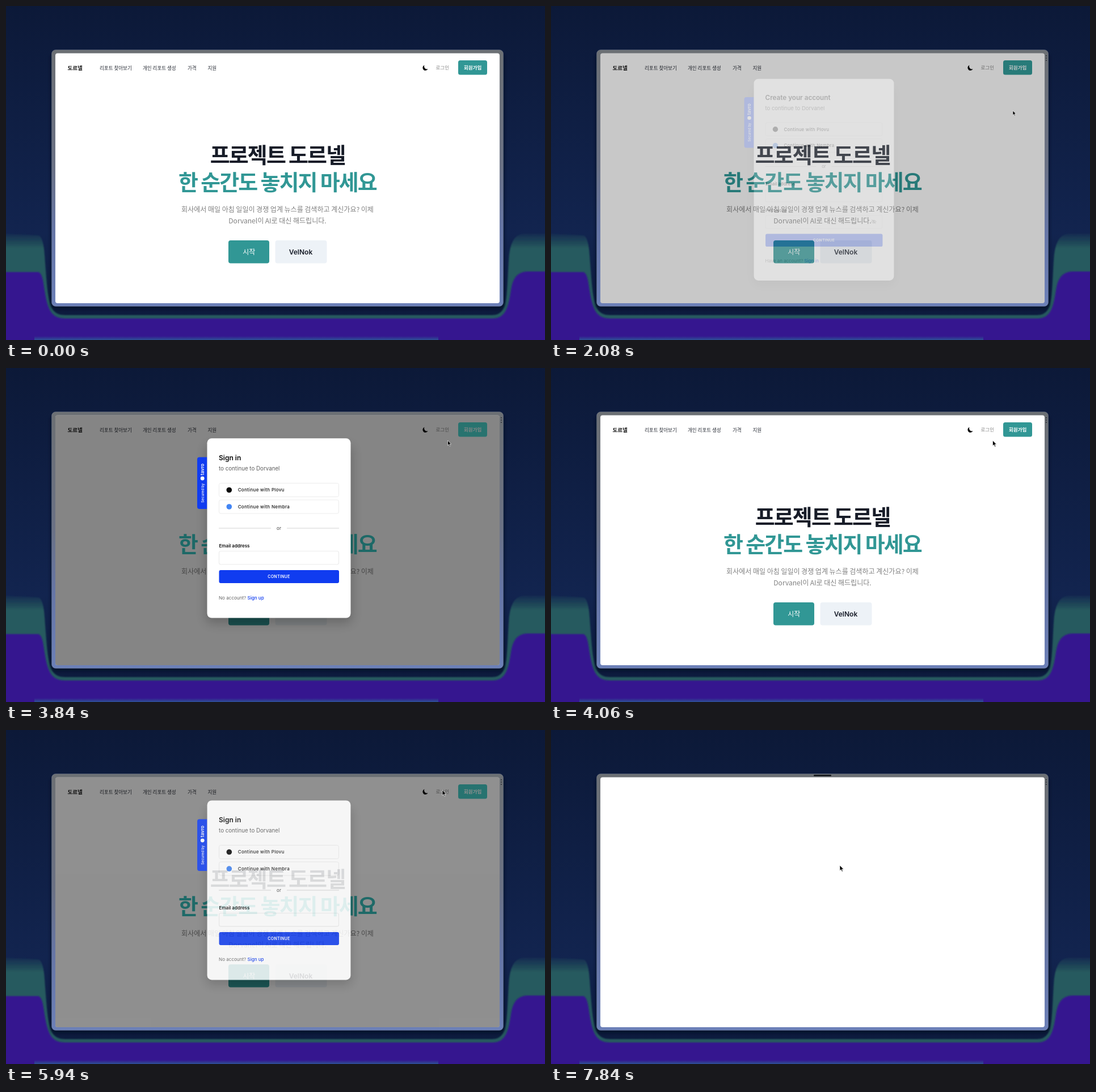
Recreate the animation shown at these times as an HTML page. Size 950x590 px, loop 8000 ms.

```html
<!DOCTYPE html>
<html lang="ko">
<head>
<meta charset="utf-8">
<style>
html, body { margin: 0; width: 100%; height: 100%; overflow: hidden; background: #0d1a3a; }
svg { display: block; width: 950px; height: 590px; }
text { font-family: Inter, 'Noto Sans CJK KR', 'Noto Sans CJK', sans-serif; white-space: pre; }
.ko text { font-family: 'Noto Sans CJK KR', 'Noto Sans CJK', Inter, sans-serif; word-spacing: -.07em; }
.mid { text-anchor: middle; }
</style>
</head>
<body>
<svg viewBox="0 0 950 590" xmlns="http://www.w3.org/2000/svg">
  <defs>
    <linearGradient id="sky" x2="0" y2="1">
      <stop offset="0" stop-color="#0c1938"/><stop offset=".68" stop-color="#12244f"/><stop offset="1" stop-color="#0b1838"/>
    </linearGradient>
    <linearGradient id="haze" gradientUnits="userSpaceOnUse" x1="0" x2="0" y1="398" y2="428">
      <stop offset="0" stop-color="#265a5e" stop-opacity="0"/><stop offset="1" stop-color="#265a5e"/>
    </linearGradient>
    <linearGradient id="frame" x2="0" y2="1">
      <stop offset="0" stop-color="#6c7074"/><stop offset=".45" stop-color="#6b7285"/>
      <stop offset=".7" stop-color="#6676a6"/><stop offset="1" stop-color="#6c80b8"/>
    </linearGradient>
    <linearGradient id="floor" x2="0" y2="1">
      <stop offset="0" stop-color="#2a6a98" stop-opacity="0"/><stop offset="1" stop-color="#2a6a98" stop-opacity=".7"/>
    </linearGradient>
    <filter id="soft"><feGaussianBlur stdDeviation="1"/></filter>
    <filter id="shade" x="-20%" y="-20%" width="140%" height="140%"><feGaussianBlur stdDeviation="9"/></filter>
    <filter id="near" x="-20%" y="-20%" width="140%" height="140%"><feGaussianBlur stdDeviation="2"/></filter>
    <clipPath id="view"><rect x="87" y="83.5" width="783" height="441.5" rx="4"/></clipPath>
  </defs>

  <rect width="950" height="590" fill="url(#sky)"/>
  <path fill="url(#haze)" filter="url(#soft)" d="M-5 402L58 405Q66 410 68 440C74 520 74 546 104 546H856C884 546 882 520 886 450Q888 404 912 402H955V595H-5Z"/>
  <path fill="#35168f" filter="url(#soft)" d="M-5 470H56Q63 470 66 490C72 530 76 552 104 552H858C882 552 886 528 890 502Q894 470 918 469H955V595H-5Z"/>
  <rect x="50" y="583" width="712" height="7" fill="url(#floor)"/>
  <rect x="78" y="82" width="801" height="454" rx="9" fill="#050c20" opacity=".55" filter="url(#near)"/>
  <rect x="80.5" y="77.5" width="796" height="453" rx="7" fill="url(#frame)" stroke="#8389a0" stroke-opacity=".4"/>
  <g id="dots" fill="#33363c"><circle cx="873" cy="88" r="1.1"/><circle cx="873" cy="92" r="1.1"/><circle cx="873" cy="96" r="1.1"/></g>
  <rect id="bar" y="79" height="2.5" rx="1.2" fill="#111418"/>

  <g clip-path="url(#view)">
    <rect x="87" y="83" width="783" height="443" fill="#fff"/>
    <g id="page" class="ko"></g>
    <g id="layer">
      <rect x="87" y="83" width="783" height="443" opacity=".48"/>
      <g id="up"></g>
      <g id="in"></g>
    </g>
  </g>
  <g id="arrow"><path d="M0 0V9.6L2.2 7.6L3.8 11.2L5.4 10.5L3.8 7H6.8Z" stroke="#fff" stroke-width=".7" stroke-linejoin="round"/></g>
  <g id="hand"><path d="M-1.2 1Q0-.6 1.2 1V4L2.2 3.6Q3 3.6 3.2 4.2Q4.4 4 4.6 4.9Q6 4.8 6 6V8.5L4.8 11H-1L-3.6 7.2Q-4.3 5.8-2.9 5.9L-1.2 7.4Z" fill="#fff" stroke="#111" stroke-width=".9" stroke-linejoin="round"/></g>
</svg>
<script>
const $ = id => document.getElementById(id);
const LOOP = 8000;
const BLUE = '#103cf0';

const text = (x, y, size, str, fill = '#111', weight = 400, more = '') =>
  `<text x="${x}" y="${y}" font-size="${size}" fill="${fill}" font-weight="${weight}" ${more}>${str}</text>`;
const rect = (x, y, w, h, r, fill, more = '') =>
  `<rect x="${x}" y="${y}" width="${w}" height="${h}" rx="${r}" fill="${fill}" ${more}/>`;
const dot = (x, y, r, fill) => `<circle cx="${x}" cy="${y}" r="${r}" fill="${fill}"/>`;
const MID = 'class="mid"';

// Landing page
const nav = [[165, '리포트 찾아보기'], [241, '개인 리포트 생성'], [320, '가격'], [355.5, '지원']];
$('page').innerHTML =
  text(108.5, 112.7, 9.5, '도르넬', '#111', 700) +
  nav.map(([x, s]) => text(x, 112.5, 8.55, s, '#2b2f38', 500)).join('') +
  '<path d="M737.6 104.6A4.8 4.8 0 1 0 743.6 110.9A4.6 4.6 0 0 1 737.6 104.6Z" fill="#0a0a0a"/>' +
  text(757.5, 112.3, 8.5, '로그인', '#8a8a8a') +
  rect(797, 96, 51, 25.5, 3.5, '#319795', 'id="join"') +
  text(822.7, 112.2, 8.5, '회원가입', '#fff', 700, MID) +
  text(478.5, 277.4, 38, '프로젝트 도르넬', '#171c28', 700, MID + ' letter-spacing="-1.9"') +
  text(478.5, 325.4, 38, '한 순간도 놓치지 마세요', '#319795', 700, MID + ' id="slogan" letter-spacing="-1.9"') +
  text(478.5, 364.3, 12.05, '회사에서 매일 아침 일일이 경쟁 업계 뉴스를 검색하고 계신가요? 이제', '#808080', 400, MID) +
  text(478.5, 383.8, 12.05, 'Dorvanel이 AI로 대신 해드립니다.', '#808080', 400, MID) +
  rect(392, 414, 72, 40.5, 4, '#319795') +
  text(428.2, 438.8, 12, '시작', '#fff', 500, MID) +
  rect(474.5, 414, 91, 40.5, 4, '#edf2f7') +
  text(519.5, 438.8, 12, 'VelNok', '#171c28', 600, MID + ' style="font-family:Inter,sans-serif"');

// Account dialogs
const box = (y, h, more = '') => rect(375.5, y, 211, h, 3, '#fff', `stroke="#ececec" ${more}`);
const provider = (y, name, color, id) =>
  box(y - 12, 24) + `<g id="${id}">${dot(393.3, y, 4.8, color)}</g>` +
  text(408.7, y + 2.9, 8, 'Continue with ' + name, '#151515', 500, 'letter-spacing=".3"');
const field = (y, label) =>
  text(375.5, y + 2.9, 8, label, '#111', 600) + box(y + 9, 23.5, 'stroke-width="1.2"');

function dialog(key, title, height, fields, btnY, ask, link) {
  return rect(352, 136, 258, height - 2, 12, '#000', 'opacity=".2" filter="url(#shade)"') +
    `<path d="M354.5 157.5H341Q337 157.5 337 161.5V245Q337 249 341 249H354.5Z" fill="${BLUE}"/>` +
    `<g transform="translate(348.6 238)rotate(-90)">${text(0, 0, 6.3, 'Secured by', '#fff', 500)}${dot(43, -2.4, 3.4, '#fff')}${text(48.5, .6, 8.3, 'tavro', '#fff', 600)}</g>` +
    rect(354.5, 124.3, 253, height, 8, '#fff') +
    text(375, 163, 12, title, '#0b0b0b', 600) +
    text(375, 180.6, 9.75, 'to continue to Dorvanel', '#5c5c5c') +
    provider(215.5, 'Plovu', '#0a0a0a', key + 'A') + provider(245, 'Nembra', '#4285f4', key + 'B') +
    '<path d="M375 283H467M495 283H587" stroke="#d4d4d4"/>' +
    text(481, 285.7, 8, 'or', '#444', 400, MID) + fields +
    rect(375.5, btnY - 11.5, 211.5, 23, 3, BLUE) +
    text(481, btnY + 2.5, 7, 'CONTINUE', '#fff', 600, MID + ' letter-spacing=".3"') +
    text(375, btnY + 40, 8.1, `${ask} <tspan fill="${BLUE}" font-weight="500">${link}</tspan>`, '#666');
}

const eye = '<g fill="none" stroke="#777" stroke-width=".9"><path d="M566.5 382.8Q571 377.5 575.5 382.8Q571 388 566.5 382.8Z"/><circle cx="571" cy="382.8" r="1.4"/><path d="M567.5 379L574.5 386.5"/></g>';
const entry = (y, name) =>
  text(414.5, y - 1.8, 8.6, name, '#fff', 500) + text(414.5, y + 8.3, 7.7, 'hey@vum.zz', '#bdbdbd');

$('up').innerHTML = dialog('u', 'Create your account', 365, field(314.5, 'Email address') + field(362.5, 'Password') + eye,
  416.5, 'Have an account?', 'Sign in');
$('in').innerHTML = dialog('i', 'Sign in', 317.2, field(314.5, 'Email address'), 368.5, 'No account?', 'Sign up') +
  '<path id="go" d="M564.5 245H572.5M569 241.5L572.5 245L569 248.5" fill="none" stroke="#666"/>' +
  '<path id="spin" d="M393.3 240.5A4.5 4.5 0 1 1 388.8 245" fill="none" stroke="#555" stroke-width="1.2"/>' +
  '<g id="saved">' + dot(569, 335, 7.3, '#1a6fd8') +
  rect(375, 348, 159, 66, 5, '#000', 'opacity=".3" filter="url(#near)"') +
  rect(375.5, 347, 158.5, 66, 4.5, '#232323', 'stroke="#3a3a3a" stroke-width=".6"') +
  rect(388, 356, 19.5, 19.5, 3, '#e8dba6') + text(397.7, 368.4, 7, 'ne', '#91845a', 600, MID) + entry(366, 'newsletters.vum.zz') +
  rect(388, 384, 19.5, 19.5, 3, '#0c0c0c') + dot(397.7, 393.7, 8.6, '#f2f2f2') + entry(394, 'Quovine') + '</g>';

// [time, x, y] of the pointer tip
const path = [
  [320, 921, 176], [560, 858, 124], [760, 834, 113], [1480, 834, 113], [1900, 814, 185], [2260, 814, 185],
  [2660, 769, 108], [3300, 769, 108], [3700, 778.5, 128], [4940, 778.5, 128], [5200, 585.5, 232.5],
  [5270, 575, 236], [5560, 778, 89], [5720, 769, 106], [6060, 769, 106], [6500, 510.5, 234],
  [6740, 510.5, 234], [7000, 509, 239]
];
const hands = [[640, 900], [2560, 2830], [5590, 5830], [6380, 6760]];
const saves = [[3180, 3800], [6190, 6690]];
const clicks = [850, 2060, 2780, 3915, 5780, 6680];
const shows = [['up', 900, 2025, 306.8], ['in', 2820, 3880, 282.9], ['in', 5820, 9000, 282.9]];
const BLANK = 7700, LOAD = 6690, FADE = 170, PRESS = 130;

const clamp = v => Math.max(0, Math.min(1, v));
const within = (list, t) => list.some(([a, b]) => t >= a && t < b);
const show = (id, on) => $(id).style.display = on ? '' : 'none';
const mix = (a, b, k) => `rgb(${a.map((v, i) => Math.round(v + (b[i] - v) * k))})`;
const smooth = p => p * p * (3 - 2 * p);
const TEAL = [49, 151, 149];

function tip(t) {
  let i = path.findIndex(p => p[0] > t);
  if (i < 0) return path[path.length - 1].slice(1);
  const [t0, x0, y0] = path[Math.max(0, i - 1)], [t1, x1, y1] = path[i];
  const e = smooth(clamp((t - t0) / (t1 - t0 || 1)));
  return [x0 + (x1 - x0) * e, y0 + (y1 - y0) * e];
}

function draw(t) {
  const blank = t >= BLANK;
  const now = blank ? null : shows.find(s => t >= s[1] && t < s[2] + FADE);
  let k = 0;
  show('up', now && now[0] === 'up');
  show('in', now && now[0] === 'in');
  if (now) {
    const [id, start, end, cy] = now;
    k = t < end ? 1 - (1 - clamp((t - start) / FADE)) ** 2 : (1 - clamp((t - end) / FADE)) ** 2;
    const s = 1 - .08 * (1 - k) ** 2;
    $(id).setAttribute('transform', `translate(481 ${cy})scale(${s})translate(-481 ${-cy})`);
    $(id).setAttribute('opacity', k);
  }
  // the dialog fades inside a layer that fades too
  $('layer').setAttribute('opacity', k);
  $('slogan').setAttribute('fill', mix(TEAL, [56, 200, 196], k ** 3));
  $('join').setAttribute('fill', mix(TEAL, [76, 220, 212], k ** 3));
  show('page', !blank);
  show('saved', within(saves, t));

  const busy = t >= LOAD;
  show('go', t >= 6380 && !busy);
  show('spin', busy);
  show('iB', !busy);
  $('spin').setAttribute('transform', `rotate(${(t - LOAD) * .6} 393.3 245)`);

  const w = 31 * clamp((t - 7280) / 160);
  $('bar').setAttribute('x', 478.5 - w / 2);
  $('bar').setAttribute('width', w);
  show('dots', t >= 340);

  const [x, y] = tip(t), hand = within(hands, t);
  const press = Math.max(...clicks.map(c => smooth(clamp(1 - Math.abs(t - c) / PRESS))));
  show('hand', hand);
  show('arrow', t >= 320 && !hand);
  for (const id of ['hand', 'arrow']) $(id).setAttribute('transform', `translate(${x} ${y})scale(${1 - .22 * press})`);
}

const begin = performance.now();
function tick() {
  draw((performance.now() - begin) % LOOP);
  requestAnimationFrame(tick);
}
draw(0);
requestAnimationFrame(tick);
</script>
</body>
</html>
```
